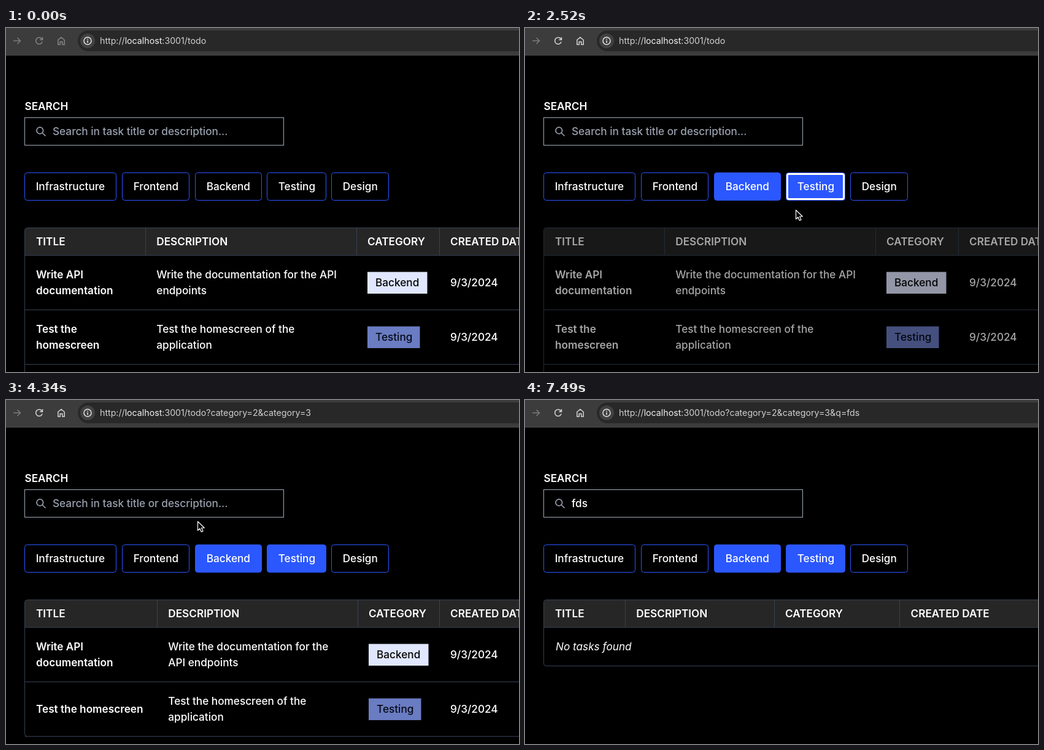
Animation, 836 px wide and 562 px high, one loop 8.12 s. Source, as an HTML page:

```html
<!DOCTYPE html>
<html lang="en">
<head>
<meta charset="utf-8">
<title>Todo filter</title>
<style>
  html, body { margin: 0; width: 100%; height: 100%; overflow: hidden; background: #000; }
  svg { display: block; }
  text { font: 500 17.2px Inter, sans-serif; fill: #fff; white-space: pre; }
  .bold { font-weight: 600; }
  .thin { font-weight: 450; }
  .url { font: 400 14.2px Inter, sans-serif; fill: #d0d0d0; }
  .url tspan { fill: #f2f2f2; }
  .line { fill: none; stroke: #364153; }
  .icon { fill: none; stroke: #d4d4d4; stroke-width: 1.5; }
  .field { fill: none; stroke: #99a1af; stroke-width: 1.7; stroke-linecap: round; stroke-linejoin: round; }
  .pointer { fill: #000; stroke: #fff; stroke-width: 1.2; stroke-linejoin: round; }
</style>
</head>
<body>
<svg id="stage" width="836" height="562" viewBox="0 0 836 562">
  <rect width="836" height="45" fill="#3c3c3c"/>
  <rect y="44" width="836" height="1" fill="#474747"/>
  <rect x="117" y="4" width="760" height="34" rx="17" fill="#282828"/>
  <circle cx="133" cy="21" r="12" fill="#414141"/>
  <path class="icon" style="stroke:#7c7c7c" d="M12 21H23.5M18.500 16L23.500 21L18.500 26"/>
  <g id="nav" class="icon">
    <path d="M58.600 18A5.400 5.400 0 1 0 59.200 22.500M59.500 15V19.200H55.300"/>
    <path d="M84.800 19.500L90 15.200L95.200 19.500V27H91.800V22.500H88.200V27H84.800Z"/>
  </g>
  <g class="icon" style="stroke:#e6e6e6"><circle cx="133" cy="21" r="6"/><path d="M133 20.200V24.200M133 17.500V19"/></g>
  <text class="url" x="153" y="26">http://<tspan>localhost</tspan>:3001/todo<tspan id="query" style="fill:#d0d0d0"></tspan></text>

  <text class="bold" x="30.500" y="134">SEARCH</text>
  <rect id="box" fill="none"/>
  <g id="lens" class="field"><circle cx="55.300" cy="167.500" r="5.300"/><path d="M59.300 171.500L64 176"/></g>
  <path id="spin" class="field" d="M-7 -1.500A7 7 0 0 1 6 -3.500L7 -2M7.500 -6V-1.800H3.300M7 1.500A7 7 0 0 1 -6 3.500L-7 2M-7.500 6V1.800H-3.300"/>
  <text id="value" class="thin" x="76" y="175"></text>
  <rect id="caret" y="159" width="1.300" height="20" fill="#fff"/>
  <path id="clear" d="M425 165.500L433 173.500M433 165.500L425 173.500" stroke="#4263b8" stroke-width="2.200"/>

  <g id="tags"></g>
  <g id="table"></g>
  <g id="click" fill="none" stroke="#fff" stroke-width="1.200">
    <circle r="22"/><circle r="18.500" stroke-width="1.600"/>
  </g>
  <path id="arrow" class="pointer" d="M.5 .5V15.200L3.900 12L6.300 17.500L9 16.400L6.600 11H11.300Z"/>
  <path id="hand" class="pointer" style="fill:#fff;stroke:#000;stroke-width:.9"
    d="M-1.800 10V1C-1.800 -1.300 1 -1.300 1 1V5.500C1.500 4 3.600 4.300 3.700 6C4.500 4.700 6.200 5.200 6.300 6.700C7.300 5.700 8.800 6.300 8.800 8V11.500C8.800 14 7.500 15 7.200 17.500H-.5C-1 15 -3 13.500 -5 10.500C-6 8.500 -3.500 7.500 -1.800 10ZM1.500 11V14.500M3.600 11V14.500M5.700 11V14.500"/>
  <path id="beam" fill="none" stroke="#fff" stroke-width="1.300" d="M-3 -8.500Q0 -8.500 0 -6.500V6.500Q0 8.500 -3 8.500M3 -8.500Q0 -8.500 0 -6.500V6.500Q0 8.500 3 8.500"/>
</svg>
<script>
const LOOP = 8120, STEP = 70;
const $ = id => document.getElementById(id);
const label = (x, y, s, cls = '', fill = '#fff') =>
  `<text x="${x}" y="${y}" class="${cls}" style="fill:${fill}">${s}</text>`;
const show = (id, on) => $(id).setAttribute('visibility', on ? 'visible' : 'hidden');
const within = (t, a, b) => t >= a && t < b;

// Filter buttons
const TAGS = [['Infrastructure', 30, 150], ['Frontend', 189, 110], ['Backend', 308, 109],
  ['Testing', 425, 97], ['Design', 530, 94]];
$('tags').innerHTML = TAGS.map(([name, x, w]) => `<g>
  <rect x="${x + .5}" y="236.5" width="${w - 1}" height="45" rx="4" stroke="#2b55ff"/>
  <rect x="${x + 2.5}" y="238.500" width="${w - 5}" height="41" rx="2.500" fill="none" stroke="#fff" stroke-width="3"/>
  ${label(x + 18.7, 265, name)}</g>`).join('');

function paintTag(i, fill, ring) {
  const [body, halo] = $('tags').children[i].querySelectorAll('rect');
  body.setAttribute('fill', fill);
  halo.setAttribute('visibility', ring ? 'visible' : 'hidden');
}

// Task tables
const API = ['Write API|documentation', 'Write the documentation|for the API endpoints', 'Backend'];
function table(cols, rows, bottom, heads = ['TITLE', 'DESCRIPTION', 'CATEGORY', 'CREATED DATE']) {
  const lines = (x, mid, s, cls) => {
    const parts = s.split('|');
    return parts.map((p, i) => label(x, mid + 6 + 26 * (i - (parts.length - 1) / 2), p, cls)).join('');
  };
  const body = rows.map(([title, text, tag], i) => {
    const mid = 416 + 89 * i, x = cols[2], back = tag === 'Backend';
    return lines(49, mid, title, 'bold') + lines(cols[1], mid, text, 'thin') +
      `<rect x="${x}" y="${mid - 17.500}" width="${back ? 97.500 : 85.500}" height="35.500" fill="${back ? '#e0e7ff' : '#6a7cc2'}"/>` +
      label(x + 13, mid + 6, tag, 'thin', back ? '#050505' : '#060a18') +
      label(724, mid + 6, '9/3/2024') +
      `<path class="line" d="M31 ${460.5 + 89 * i}H836"/>`;
  }).join('');
  return `<path d="M31 372V330Q31 327 34 327H836V372Z" fill="#262626"/>` +
    `<rect class="line" x="30.500" y="326.500" width="900" height="${bottom - 326}" rx="4"/>` +
    `<path class="line" d="M31 371.500H836${cols.slice(1).map(x => `M${Math.round(x - 18.2) + .5} 327V371`).join('')}"/>` +
    heads.map((h, i) => label(cols[i], 355, h, 'bold')).join('') + body;
}
const wide = [49, 245.3, 589, 724], narrow = [49, 264.3, 591, 724];
const home = 'Test the homescreen of the|application';
const api = text => ['Write API|documentation', text, 'Backend'];
const apiRow = api('Write the documentation for the|API endpoints');
const TABLES = [
  table(wide, [api('Write the documentation for the API|endpoints'), ['Test the|homescreen', home, 'Testing']], 640),
  table(narrow, [apiRow], 460),
  table(narrow, [apiRow, ['Test the homescreen', home, 'Testing']], 549),
  table([49, 181.3, 424, 628.5], [], 434) + label(50, 409, '<tspan font-style="italic">No tasks found</tspan>', 'thin')
];
$('table').innerHTML = TABLES.map(s => `<g>${s}</g>`).join('');
const QUERIES = ['', '?category=2', '?category=2&category=3', '?category=2&category=3&q=fds'];

// Pointer path: time, x, y
const PATH = [[70, 614, 552], [210, 530, 470], [350, 430, 378], [490, 394, 352], [560, 394, 352],
  [700, 372, 295], [840, 358, 263], [1190, 358, 263], [1330, 400, 257], [1470, 446, 252],
  [1750, 446, 258], [2170, 446, 259], [2380, 442, 292], [2520, 441, 297], [4130, 441, 297],
  [4200, 420, 280], [4340, 312, 198], [4480, 272, 175], [4550, 266, 171], [5600, 266, 171],
  [5740, 520, 135], [5810, 571, 129], [5950, 574, 136], [6650, 574, 136], [7420, 842, 540]];
function pointer(t) {
  const i = PATH.findIndex(p => p[0] > t);
  if (i < 1) return [-99, -99];
  const [a, ax, ay] = PATH[i - 1], [b, bx, by] = PATH[i], k = (t - a) / (b - a);
  return [ax + (bx - ax) * k, ay + (by - ay) * k];
}

// Opacity dips to one half and back every two seconds
const pulse = t => within(t, 1150, 3920) ? .75 + .25 * Math.cos((t - 1150) / 1000 * Math.PI) : 1;

function render(t) {
  const page = [3220, 3920, 7490].filter(s => t >= s).length;
  [...$('table').children].forEach((g, i) => g.setAttribute('visibility', i === page ? 'visible' : 'hidden'));
  $('table').setAttribute('opacity', pulse(t));
  $('query').textContent = QUERIES[page];
  $('nav').style.stroke = t < 70 ? '#858585' : '';

  const [x, y] = pointer(t);
  const over = i => y > 236 && y < 282 && x > TAGS[i][1] && x < TAGS[i][1] + TAGS[i][2];
  const fill = (i, chosen) => t >= chosen ? '#2b57ff' : over(i) ? '#2147d2' : '#000';
  TAGS.forEach((_, i) => paintTag(i, fill(i, { 2: 1190, 3: 1610 }[i] || LOOP),
    i === 2 && within(t, 980, 1540) || i === 3 && within(t, 1540, 3850)));

  const focus = within(t, 4620, 6090), typed = [5040, 5180, 5320].filter(s => t >= s).length;
  const busy = within(t, 5040, 7490), w = focus ? 2 : 1;
  const attrs = { x: 31 - w / 2, y: 147 - w / 2, width: 421 + w, height: 44 + w,
    stroke: focus ? '#2b55ff' : '#a3abb8', 'stroke-width': w };
  for (const k in attrs) $('box').setAttribute(k, attrs[k]);
  $('value').textContent = typed ? 'fds'.slice(0, typed) : 'Search in task title or description...';
  $('value').style.fill = typed ? '#fff' : '#99a1af';
  $('caret').setAttribute('x', [76, 82, 92.5, 101][typed]);
  show('caret', focus);
  show('clear', focus && typed);
  show('lens', !busy);
  show('spin', busy);
  $('spin').setAttribute('transform', `translate(56.5 169) rotate(${(t - 5600) * .36})`);

  const hidden = within(t, 5040, 5670), text = y > 146 && y < 192 && x > 30 && x < 453;
  const hand = TAGS.some((_, i) => over(i));
  show('hand', hand);
  show('beam', text && !hidden);
  show('arrow', !hand && !text);
  for (const id of ['hand', 'beam', 'arrow']) $(id).setAttribute('transform', `translate(${x} ${y})`);
  show('click', [[980, 1120], [1540, 1680], [3710, 3850], [4620, 4690], [6090, 6230]].some(([a, b]) => within(t, a, b)));
  $('click').setAttribute('transform', `translate(${x + 1} ${y + 2})`);
}

const start = performance.now();
(function tick() {
  const t = (performance.now() - start) % LOOP;
  render(Math.floor(t / STEP) * STEP);
  requestAnimationFrame(tick);
})();
</script>
</body>
</html>
```
